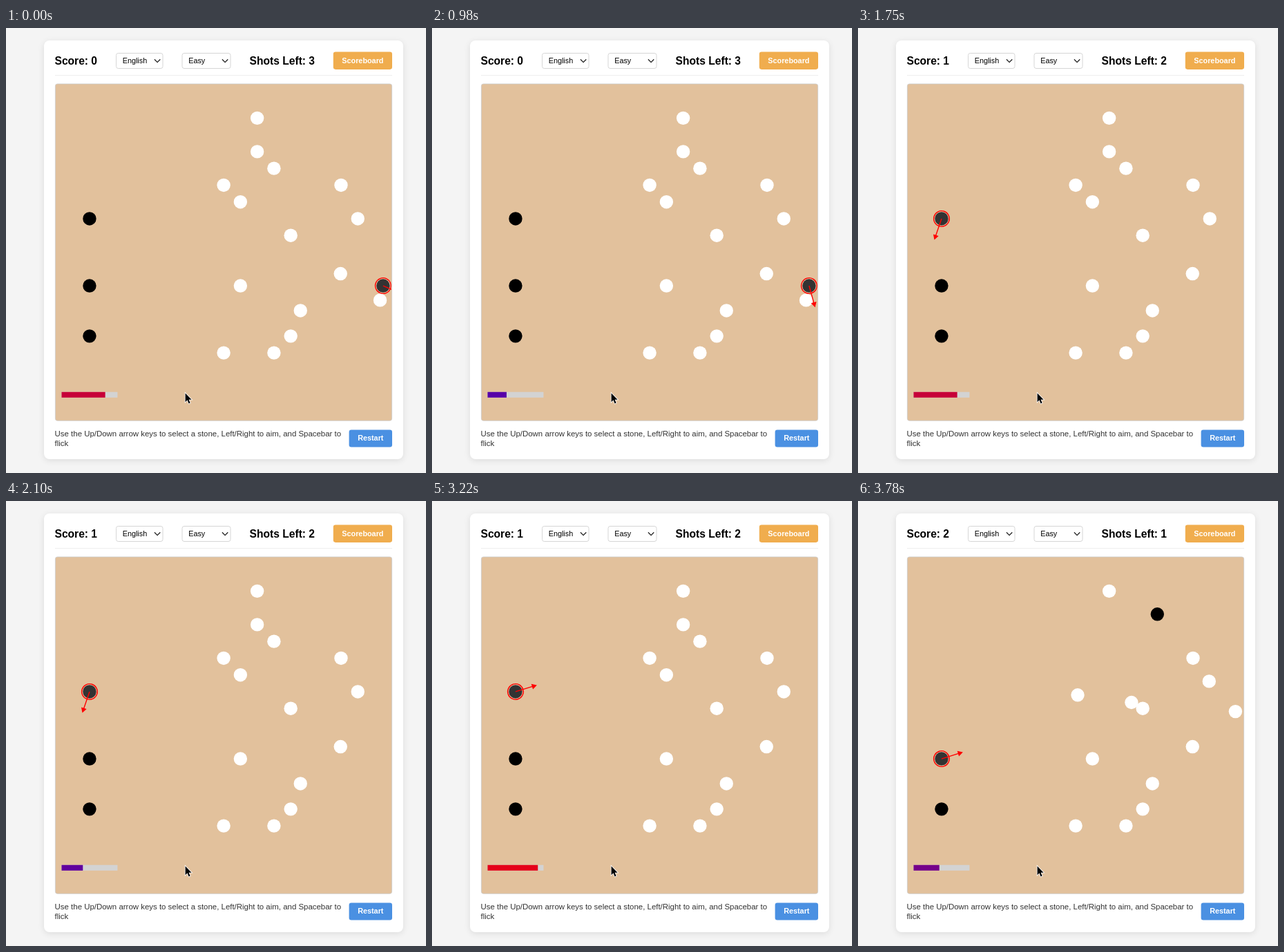
An HTML page with a canvas that plays this animation: 608x644 px, repeating every 3.85 s.

```html
<!DOCTYPE html>
<html lang="en">
<head>
<meta charset="utf-8">
<title>Stone flick</title>
<style>
  html, body { margin: 0; width: 100%; height: 100%; overflow: hidden; background: #f4f4f4; }
  #stage { position: relative; width: 608px; height: 644px; overflow: hidden; }
  #card {
    position: absolute; left: 55px; top: 18px; width: 520px; height: 605.5px;
    background: #fff; border-radius: 8px; box-shadow: 0 2px 10px rgba(0, 0, 0, .1);
  }
  svg, canvas { position: absolute; left: 0; top: 0; }
  text { font-family: "Liberation Sans", Arial, Helvetica, sans-serif; font-size: 10.84px; }
  .head { font-size: 15.6px; font-weight: bold; }
  .button { font-weight: bold; fill: #fff; text-anchor: middle; }
  .help { font-size: 11.45px; fill: #333; }
  .select { fill: #fff; stroke: #ccc; stroke-width: .8; }
  .chevron { fill: none; stroke: #222; stroke-width: 1.3; stroke-linecap: round; stroke-linejoin: round; }
</style>
</head>
<body>
<div id="stage">
  <div id="card"></div>
  <svg width="608" height="644">
    <text class="head" id="score" x="70.5" y="52.5">Score: 0</text>
    <rect class="select" x="159.5" y="36.5" width="67.5" height="22" rx="3"/>
    <text x="168.7" y="51.2">English</text>
    <path class="chevron" d="M215.3 45.8l3.8 3.8 3.8-3.8"/>
    <rect class="select" x="255" y="36.5" width="70" height="22" rx="3"/>
    <text x="264.2" y="51.2">Easy</text>
    <path class="chevron" d="M313.3 45.8l3.8 3.8 3.8-3.8"/>
    <text class="head" id="shots" x="352.6" y="52.5">Shots Left: 3</text>
    <rect x="473.8" y="34.5" width="85.2" height="25.4" rx="3.3" fill="#f0ad4e"/>
    <text class="button" x="516.4" y="50.6">Scoreboard</text>
    <rect x="71" y="68" width="488" height="1" fill="#eee"/>
    <rect x="71.4" y="80.9" width="487.2" height="487.4" rx="3" fill="#e2c19c" stroke="#ccc" stroke-width=".8"/>
    <text class="help" x="70.6" y="591">Use the Up/Down arrow keys to select a stone, Left/Right to aim, and Spacebar to</text>
    <text class="help" x="70.6" y="604.8">flick</text>
    <rect x="496.6" y="581.4" width="62.4" height="25.2" rx="3.3" fill="#4a90e2"/>
    <text class="button" x="527.8" y="597.3">Restart</text>
  </svg>
  <canvas id="board" width="608" height="644"></canvas>
</div>
<script>
const LOOP = 3850, STEP = 70;
const SHOTS = [1391, 3300];
const CELLS = 20, CELL = 30, UNIT = 0.809;
const ctx = document.getElementById("board").getContext("2d");
const score = document.getElementById("score");
const shots = document.getElementById("shots");

// Stones sit on grid cells; slides add a slowing shift of dx, dy cells
const stone = (x, y, ...slides) => ({ x, y, slides });
const slide = (start, end, dx, dy) => ({ start, end, dx, dy });

const whites = [
  stone(12, 2), stone(17, 6), stone(14, 9), stone(11, 12),
  stone(14, 15), stone(13, 16), stone(10, 16),
  stone(16.97, 11.28), stone(14.58, 13.48),
  stone(19.33, 12.86, slide(SHOTS[0], 1465, -1, 7.5)),
  stone(10, 6, slide(3385, 3780, 0.12, 2.2)),
  stone(11, 7, slide(3405, 3780, 2.33, 1.64)),
  stone(12, 4, slide(3425, 3600, -3.1, -4.4)),
  stone(13, 5, slide(3425, 3780, 4.96, 2.38)),
  stone(18, 8, slide(3600, 3780, 1.53, 1.18))
];
const blacks = [
  stone(19.51, 12, slide(SHOTS[0], 2890, -27.9, 23.3)),
  stone(2, 8, slide(SHOTS[1], 3425, 10.18, -3.21), slide(3425, 3780, 2.69, -1.41)),
  stone(2, 12), stone(2, 15)
];

function place(s, t) {
  let { x, y } = s;
  for (const m of s.slides) {
    const k = Math.min(1, Math.max(0, (t - m.start) / (m.end - m.start)));
    const e = k * (2 - k);
    x += m.dx * e;
    y += m.dy * e;
  }
  return { x: x * CELL, y: y * CELL, on: x > 0 && x < CELLS && y > 0 && y < CELLS };
}

// Key repeat: one press, a pause, then a step every 30 ms
function held(t, start, max) {
  const d = t - start;
  if (d < 0) return 0;
  return d < 225 ? 1 : Math.min(max, 2 + Math.floor((d - 225) / 30));
}
const aim = t => 0.4 + 0.1 * held(t, 545, 15) - 0.1 * held(t, 2235, 22);

// Power swings between 0 and 1
const power = t => 1 - Math.abs(((t + 1067) / 875) % 2 - 1);

function drawBar(p) {
  ctx.fillStyle = "#d3d3d3";
  ctx.fillRect(10, 550, 100, 10);
  ctx.fillStyle = `rgb(${255 * p}, 0, ${255 * (1 - p)})`;
  ctx.fillRect(10, 550, 100 * p, 10);
}

function drawStone(p, fill) {
  if (!p.on) return;
  ctx.fillStyle = fill;
  ctx.beginPath();
  ctx.arc(p.x, p.y, 12, 0, 7);
  ctx.fill();
}

function drawAim(p, angle) {
  ctx.save();
  ctx.translate(p.x, p.y);
  ctx.rotate(angle);
  ctx.strokeStyle = ctx.fillStyle = "red";
  ctx.lineWidth = 1.7;
  ctx.beginPath();
  ctx.arc(0, 0, 14, 0, 7);
  ctx.moveTo(0, 0);
  ctx.lineTo(36, 0);
  ctx.stroke();
  ctx.beginPath();
  ctx.moveTo(40, 0);
  ctx.lineTo(31, -5);
  ctx.lineTo(31, 5);
  ctx.fill();
  ctx.restore();
}

const pointer = new Path2D("M259.6 528.4v12.8l2.9-2.7 2.1 4.9 2-.9-2-4.7h4z");
function drawPointer() {
  ctx.lineWidth = 1.6;
  ctx.strokeStyle = "#fff";
  ctx.fillStyle = "#000";
  ctx.stroke(pointer);
  ctx.fill(pointer);
}

function draw(t) {
  const chosen = SHOTS.filter(s => t >= s).length;
  const spots = whites.map(s => place(s, t));

  ctx.clearRect(0, 0, 608, 644);
  ctx.save();
  ctx.translate(72.4, 81.8);
  ctx.scale(UNIT, UNIT);
  ctx.beginPath();
  ctx.rect(0, 0, CELLS * CELL, CELLS * CELL);
  ctx.clip();
  drawBar(power(t));
  spots.forEach(p => drawStone(p, "#fff"));
  blacks.forEach((s, i) => drawStone(place(s, t), i === chosen ? "#333" : "#000"));
  drawAim(place(blacks[chosen], t), aim(t));
  ctx.restore();
  drawPointer();

  score.textContent = "Score: " + spots.filter(p => !p.on).length;
  shots.textContent = "Shots Left: " + (3 - chosen);
}

const begin = performance.now();
function tick() {
  const t = (performance.now() - begin) % LOOP;
  draw(Math.floor(t / STEP) * STEP);
  requestAnimationFrame(tick);
}
tick();
</script>
</body>
</html>
```
